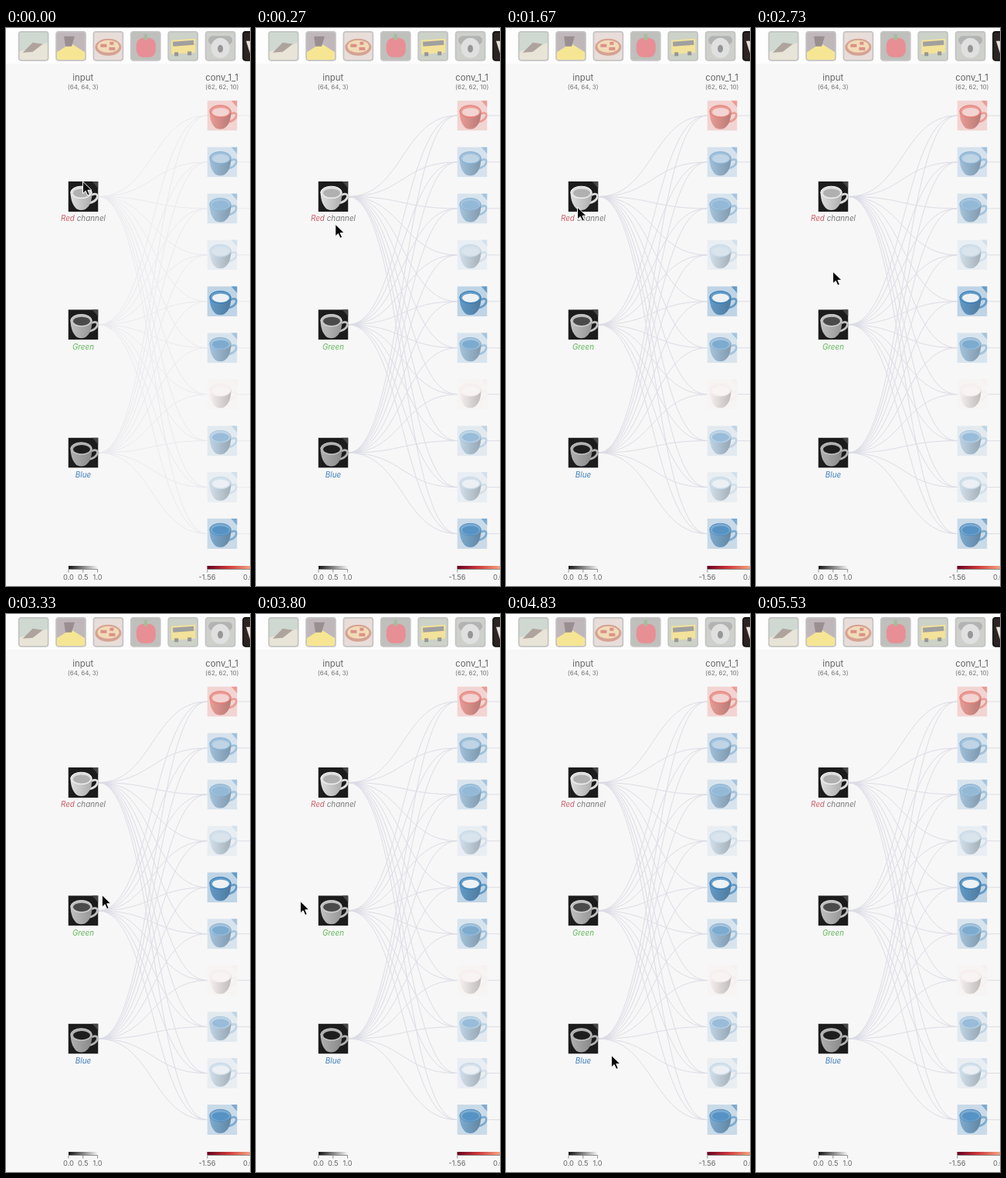
An HTML page that plays this animation: 316 px wide and 720 px high, repeating every 6430 ms.

```html
<!DOCTYPE html>
<html lang="en">
<head>
<meta charset="utf-8">
<title>Input and first convolution layer</title>
<style>
  html, body { margin: 0; width: 100%; height: 100%; overflow: hidden; background: #f7f7f7; }
  svg { display: block; width: 316px; height: 720px; }
  text { font-family: Inter, Roboto, sans-serif; text-anchor: middle; fill: #777; }
  .title { font-size: 11.4px; fill: #666; }
  .size { font-size: 8.1px; }
  .label { font-size: 9.9px; font-style: italic; }
  .tick { font-size: 9.3px; fill: #666; }
  .red { fill: #c95e67; }
  .green { fill: #62b85a; }
  .blue { fill: #3f7fbc; }
  .edge { fill: none; stroke: #dcdce6; }
  .axis { fill: none; stroke: #777; stroke-width: .8; }
  .body { fill: var(--cup); }
  .rim { fill: var(--cup); stroke: var(--rim); }
  .coffee { fill: var(--coffee); }
  .handle { fill: none; stroke: var(--cup); stroke-width: 2.8; }
</style>
</head>
<body>
<svg viewBox="0 0 316 720">
  <defs>
    <linearGradient id="gray"><stop stop-color="#111"/><stop offset="1" stop-color="#f7f7f7"/></linearGradient>
    <linearGradient id="heat"><stop stop-color="#67001f"/><stop offset=".5" stop-color="#d03a3c"/><stop offset="1" stop-color="#f4a582"/></linearGradient>
    <linearGradient id="shadow"><stop stop-opacity="0"/><stop offset="1" stop-opacity=".22"/></linearGradient>
    <clipPath id="tileClip"><rect width="39" height="39"/></clipPath>
    <clipPath id="thumbClip"><rect width="38" height="37" rx="3"/></clipPath>
    <path id="bowl" d="M3 13C3 25 7 33 12 36Q17 38 22 36C28 32 31 25 31 13Z"/>
    <g id="cup">
      <path class="handle" d="M29 18C36 14 40 17 37 22C35 26 31 27 27 28"/>
      <use class="body" href="#bowl"/>
      <use fill="url(#shadow)" href="#bowl"/>
      <ellipse class="rim" cx="17" cy="14" rx="13.6" ry="7.8"/>
      <ellipse class="coffee" cx="17.5" cy="15" rx="11" ry="5.6"/>
    </g>
  </defs>
  <rect width="316" height="720" fill="#f7f7f7"/>
  <rect width="316" height="46" fill="#fdfdfd"/>
  <g id="thumbs"></g>
  <g id="edges"></g>
  <g id="tiles"></g>

  <text class="title" x="99.8" y="68">input</text>
  <text class="size" x="99.8" y="78.5">(64, 64, 3)</text>
  <text class="title" x="279.5" y="68">conv_1_1</text>
  <text class="size" x="279.8" y="78.5">(62, 62, 10)</text>
  <text class="label" x="100" y="249"><tspan class="red">Red</tspan> channel</text>
  <text class="label green" x="100" y="414.5">Green</text>
  <text class="label blue" x="100" y="579.5">Blue</text>

  <rect x="81" y="694" width="38" height="4" fill="url(#gray)"/>
  <path class="axis" d="M81 702.5V698.5H118.6V702.5M99.8 698.5V702.5"/>
  <text class="tick" x="81" y="711.5">0.0</text>
  <text class="tick" x="99.8" y="711.5">0.5</text>
  <text class="tick" x="118.6" y="711.5">1.0</text>
  <rect x="260.5" y="694" width="56" height="4" fill="url(#heat)"/>
  <path class="axis" d="M260.8 702.5V698.5H320"/>
  <text class="tick" x="260.5" y="711.5">-1.56</text>
  <text class="tick" x="314" y="711.5">0.0</text>

  <path id="cursor" d="M0 0V15.6L3.7 12.2L6.3 18L8.9 16.9L6.4 11.2H11.5Z" fill="#080808" stroke="#fff"/>
</svg>
<script>
const $ = id => document.getElementById(id);
const mix = (a, b, u) => a + (b - a) * u;

// Photo strip: faded except for the selected last one
const photos = [
  ['#a9bcae', '<path fill="#d8d0b8" d="M0 26L38 14V37H0Z"/><path fill="#6f5a50" d="M5 27L18 14L31 16L18 26Z"/>'],
  ['#8f7f86', '<path fill="#f0d43c" d="M0 27L19 15L38 27V37H0Z"/><path fill="#4a3638" d="M10 6H24L20 19H12Z"/>'],
  ['#d8c4bc', '<ellipse cx="19" cy="20" rx="17" ry="11" fill="#b4583c"/><ellipse cx="19" cy="19" rx="14" ry="8" fill="#e8c080"/><path d="M9 18H17M20 22H28M21 15H26" stroke="#c03828" stroke-width="4"/>'],
  ['#8c8c88', '<rect x="7" y="8" width="25" height="25" rx="9" fill="#d83440"/><path fill="#5c8a4c" d="M17 3H21V11H17Z"/>'],
  ['#a4b09c', '<path fill="#eccc48" d="M4 11L35 9V27L4 29Z"/><path stroke="#555" stroke-width="6" d="M6 16L33 14"/><path stroke="#444" stroke-width="5" d="M8 29H13M25 28H30"/>'],
  ['#a8aca4', '<path stroke="#777" stroke-width="11" stroke-linecap="round" d="M9 11H29"/><ellipse cx="19" cy="21" rx="12" ry="13" fill="#c8c8c8"/><ellipse cx="19" cy="22" rx="3.5" ry="5" fill="#444"/>'],
  ['#2c2422', '<path fill="#e8e0d8" d="M4 12H32V26L22 35L10 31Z"/>']
];
$('thumbs').innerHTML = photos.map(([bg, art], i) => {
  const chosen = i == photos.length - 1;
  return `<g transform="translate(${16.6 + i * 48.4} 4.8)">
  <g clip-path="url(#thumbClip)" opacity="${chosen ? 1 : .55}"><rect width="38" height="37" fill="${bg}"/>${art}</g>
  <rect width="38" height="37" rx="3" fill="none" stroke="${chosen ? '#111' : '#c4c4c4'}" stroke-width="1.7"/></g>`;
}).join('');

// Diverging scale: red below zero, white at zero, blue above
const shade = v => {
  const end = v < 0 ? [222, 72, 60] : [30, 112, 178];
  return `rgb(${end.map(c => mix(247, c, Math.abs(v)))})`;
};
const gray = v => `rgb(${[v, v, v]})`;

// Brightness of cup and coffee per colour channel
const inputs = [[222, 176], [192, 74], [176, 30]];
// Activation of cup and coffee per feature map
const maps = [[-.52, -.2], [.4, .26], [.38, .46], [.17, .14], [.68, .04], [.38, .56], [-.04, -.02], [.26, .44], [.17, .05], [.56, .74]];

const inputY = i => 217.5 + i * 165.3;
const mapY = i => 113 + i * 59.95;
const tile = (x, y, bg, cup, coffee, rim, corner) =>
  `<g transform="translate(${x} ${y - 19.5})" clip-path="url(#tileClip)" style="--cup:${cup};--coffee:${coffee};--rim:${rim}">
  <rect width="39" height="39" fill="${bg}"/><path d="M31 0H39V9Z" fill="${corner}"/><use href="#cup"/></g>`;
$('tiles').innerHTML =
  inputs.map(([cup, coffee], i) =>
    tile(80.5, inputY(i), '#1c1c1c', gray(cup), gray(coffee), gray(cup + 22), '#444')).join('') +
  maps.map(([cup, coffee], i) =>
    tile(260.5, mapY(i), shade(cup * .38), shade(cup), shade(coffee), shade(cup * 1.35), shade(cup))).join('');

// Connections
$('edges').innerHTML = inputs.map((_, i) => maps.map((_, j) =>
  `<path class="edge" d="M119.5 ${inputY(i)}C190 ${inputY(i)} 190 ${mapY(j)} 260.5 ${mapY(j)}"/>`).join('')).join('') +
  maps.map((_, j) => `<path class="edge" d="M299.5 ${mapY(j)}H316"/>`).join('');

// The pointer circles clockwise around a centre that drifts from channel to channel
const orbit = (t, x, y, r, deg) => ({ t, x, y, r, deg });
const keys = [
  orbit(0, 92, 224, 27, -74),
  orbit(833, 116, 236, 26, 405),
  orbit(1667, 108, 227, 16, 885),
  orbit(2333, 114, 231, 14, 1268),
  orbit(2600, 114, 231, 14, 1268),
  orbit(2733, 97, 330, 16, 1359),
  orbit(2960, 98, 376, 20, 1511),
  orbit(3333, 94, 380, 35, 1770),
  orbit(3900, 98, 380, 42, 2041),
  orbit(4233, 79, 523, 50, 2200),
  orbit(5133, 105, 542, 50, 2740),
  orbit(5310, 105, 542, 50, 2740),
  orbit(5530, 355, 305, 50, 2740)
];
function pointerAt(t) {
  const i = keys.findIndex(k => k.t > t), a = keys[i - 1], b = keys[i];
  const u = (t - a.t) / (b.t - a.t), eased = u * u * (3 - 2 * u);
  const angle = mix(a.deg, b.deg, u) * Math.PI / 180, r = mix(a.r, b.r, eased);
  return [mix(a.x, b.x, eased) + r * Math.cos(angle), mix(a.y, b.y, eased) + r * Math.sin(angle)];
}

const LOOP = 6430, EXIT = 5530, STEP = 100 / 3;
const cursor = $('cursor'), edges = $('edges');
function draw(now) {
  const t = now % LOOP;
  cursor.style.display = t < EXIT ? '' : 'none';
  if (t < EXIT) {
    const [x, y] = pointerAt(Math.floor((t + 4) / STEP) * STEP);
    cursor.setAttribute('transform', `translate(${x} ${y})`);
  }
  edges.style.opacity = t < 30 ? .5 : 1;
}
const start = performance.now();
function tick() {
  draw(performance.now() - start);
  requestAnimationFrame(tick);
}
tick();
</script>
</body>
</html>
```
